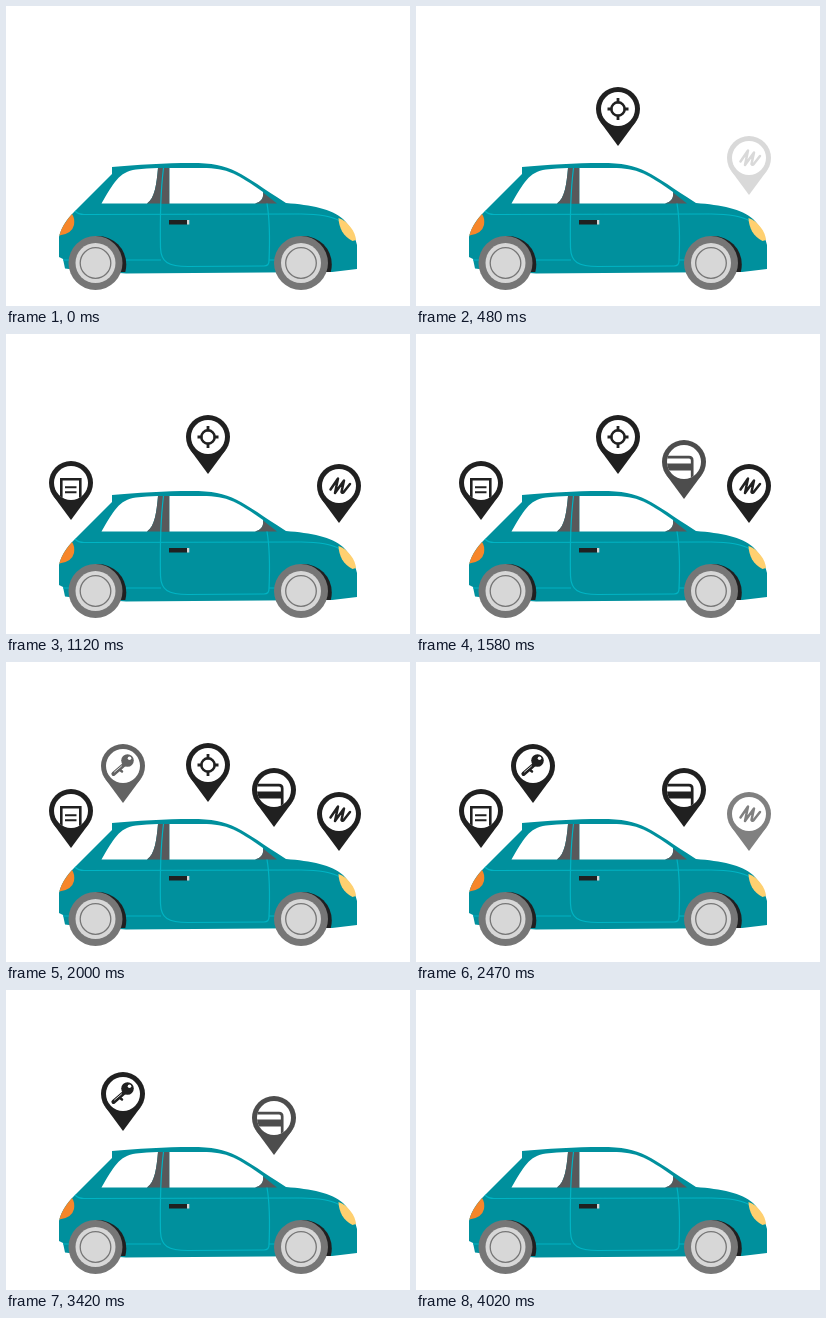
These frames come from a looping animation (404 by 300 pixels, 4320 ms). An HTML page with a canvas:

```html
<!DOCTYPE html>
<html lang="en">
<head>
<meta charset="utf-8">
<title>Car with map pins</title>
<style>
html, body { margin: 0; width: 100%; height: 100%; overflow: hidden; background: #fff; }
canvas { display: block; width: 404px; height: 300px; }
</style>
</head>
<body>
<canvas id="stage"></canvas>
<script>
const W = 404, H = 300, LOOP = 4320, TICK = 30;
const TEAL = '#00909d', LINE = '#00b4c4', DARK = '#202021', PILLAR = '#58595b';
const TYRE = '#767676', RIM = '#d7d7d7';

const canvas = document.getElementById('stage');
const ctx = canvas.getContext('2d');
const ratio = window.devicePixelRatio || 1;
canvas.width = W * ratio;
canvas.height = H * ratio;

function fill(d, color) {
  ctx.fillStyle = color;
  ctx.fill(new Path2D(d));
}

function stroke(d, color, width) {
  ctx.strokeStyle = color;
  ctx.lineWidth = width;
  ctx.stroke(new Path2D(d));
}

function disc(x, y, r, color) {
  ctx.fillStyle = color;
  ctx.beginPath();
  ctx.arc(x, y, r, 0, 2 * Math.PI);
  ctx.fill();
}

function ring(x, y, r, color, width) {
  ctx.strokeStyle = color;
  ctx.lineWidth = width;
  ctx.beginPath();
  ctx.arc(x, y, r, 0, 2 * Math.PI);
  ctx.stroke();
}

function wheel(x, y) {
  ctx.save();
  ctx.beginPath();
  ctx.rect(x, y - 30, 40, 39);
  ctx.clip();
  disc(x + 2.3, y + 1.5, 28.5, DARK);
  ctx.restore();
  disc(x, y, 27, TYRE);
  disc(x, y, 20, RIM);
  ring(x, y, 15.3, TYRE, 1.3);
}

function car() {
  // body
  fill('M106 161 C130 159 160 157 185 157 C227 157 233 167 280 197 ' +
       'C305 199 326 203 337 213 C345 221 349 230 351 239 L351 263 L326 266 ' +
       'L120 267.5 L63 263 L59 262.5 L57 253 L53 251 L53 231 ' +
       'C55 222 60 214 69 205 L106 168 Z', TEAL);
  // windows and pillars
  fill('M95.5 197.5 C107 178 113 165.5 130 163.5 Q141 162 152 162 ' +
       'C150.5 178 149 192 141 197.5 Z', '#fff');
  fill('M152 162 L163.5 162 L163.5 197.5 L141 197.5 C149 192 150.5 178 152 162 Z', PILLAR);
  fill('M154.5 197.5 L158 162 L159 162 L163.5 197.5 Z', PILLAR);
  fill('M163.5 162 L196 162 C222 162 231 168 257 186 ' +
       'C258 192 255 196 249 197.5 L163.5 197.5 Z', '#fff');
  fill('M257 186.5 L271 197.5 L249 197.5 C255 196 258 192 257 186.5 Z', PILLAR);
  // panel lines
  stroke('M69 205 Q72 208.5 78 208.5 L295 208 Q322 208 334 215', LINE, 1.2);
  stroke('M157.5 162 C154 190 154 215 154.5 242 C155 256 162 260.5 182 260.5 ' +
         'L258 260 Q263 260 263 255 C264 232 264 215 261 197.5', LINE, 1.2);
  stroke('M57 254 H66 M118 254 H155 M263 254 H270', LINE, 1.2);
  // handle and lamps
  ctx.fillStyle = DARK;
  ctx.fillRect(163, 214, 18, 4.5);
  ctx.fillStyle = RIM;
  ctx.fillRect(181, 214, 2.3, 4.5);
  fill('M66 208 Q69 212 68 219 Q66 228 53.3 229.5 Q56 219 66 208 Z', '#f6862a');
  fill('M332.5 212 C342 215 349.5 226 350 234 L346.5 235 C337 230 333 222 332.5 212 Z', '#ffd070');
  wheel(89.5, 257);
  wheel(295, 257);
}

// Icons are drawn around the centre of their pin.
function aim(c) {
  ring(0, 0, 6.7, c, 2.5);
  stroke('M0 -11 V-5.5 M0 5.5 V11 M-10.5 0 H-5.5 M5.5 0 H10.5', c, 2.8);
}

function scribble(c) {
  ctx.lineJoin = ctx.lineCap = 'round';
  stroke('M-8.5 3.5 L-1 -7.5 L-4 7 L5 -5.5 L2.5 6 Q3.5 8 5.5 5 L11 -2', c, 2.5);
}

function sheet(c) {
  stroke('M-9.7 20 V-3.8 H9.3 V20', c, 2.6);
  stroke('M-6 4.2 H5.5 M-6 9.2 H5.5', c, 2);
}

function card(c) {
  stroke('M-20 -4.8 H5 Q8.2 -4.8 8.2 -1.5 V20', c, 2.7);
  ctx.fillStyle = c;
  ctx.fillRect(-20, 1.5, 28, 7);
}

function key(c) {
  ctx.lineCap = 'round';
  stroke('M3 -3 L-9.5 7.8', c, 4.2);
  stroke('M-3 4 L-1 5.5', c, 2.5);
  disc(4.5, -5.5, 6.3, c);
  disc(6.5, -7.7, 1.8, '#fff');
  stroke('M-1.5 0 L-8.5 6', '#fff', 0.8);
}

// show / hide: [time of first step, share done at that step, share per step]
const pins = [
  { x: 202, y: 103, icon: aim, show: [30, 0.2, 0.2], hide: [2120, 0.2, 0.2] },
  { x: 333, y: 152, icon: scribble, show: [480, 0.17, 0.2], hide: [2440, 0.23, 0.2] },
  { x: 65, y: 149, icon: sheet, show: [1000, 0.2, 0.2], hide: [2930, 0.2, 0.2] },
  { x: 268, y: 128, icon: card, show: [1490, 0.2, 0.2], hide: [3420, 0.2, 0.2] },
  { x: 117, y: 104, icon: key, show: [1880, 0.14, 0.14], hide: [3870, 0.17, 0.2] }
];

function progress(t, [start, first, step]) {
  if (t < start) return 0;
  return Math.min(1, first + step * Math.floor((t - start) / TICK));
}

// Pins stand on white, so fading is a blend of the ink with white.
function ink(alpha) {
  const v = Math.round(255 - 223 * alpha);
  return `rgb(${v},${v},${v})`;
}

function drawPin(pin, t) {
  const alpha = progress(t, pin.show) - progress(t, pin.hide);
  if (alpha <= 0) return;
  const c = ink(alpha);
  ctx.save();
  ctx.translate(pin.x, pin.y);
  disc(0, 0, 22, c);
  fill('M-17.7 13.1 L0 37 L17.7 13.1 Z', c);
  disc(0, 0, 17, '#fff');
  ctx.beginPath();
  ctx.arc(0, 0, 17, 0, 2 * Math.PI);
  ctx.clip();
  pin.icon(c);
  ctx.restore();
}

function draw(t) {
  ctx.setTransform(ratio, 0, 0, ratio, 0, 0);
  ctx.fillStyle = '#fff';
  ctx.fillRect(0, 0, W, H);
  car();
  for (const pin of pins) drawPin(pin, t);
}

let origin = null;
function frame(now) {
  if (origin === null) origin = now;
  draw((now - origin) % LOOP);
  requestAnimationFrame(frame);
}
draw(0);
requestAnimationFrame(frame);
</script>
</body>
</html>
```
